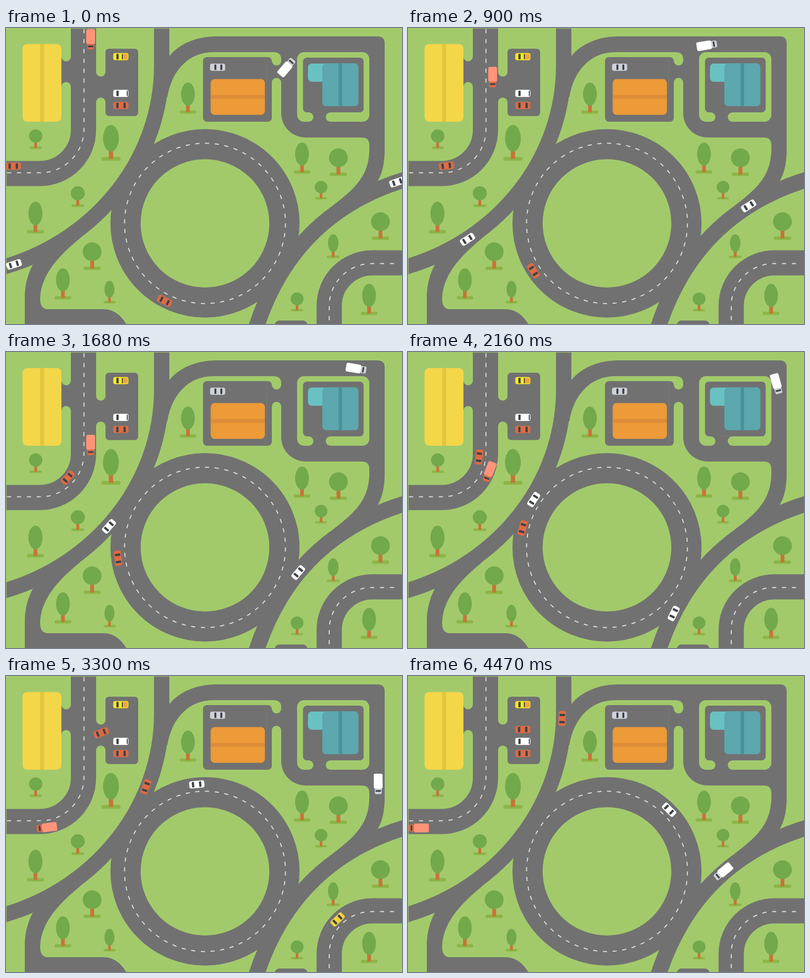
An HTML page that plays this animation: 800x600 px, repeating every 4.5 s.

```html
<!DOCTYPE html>
<html lang="en">
<head>
<meta charset="utf-8">
<title>Town traffic</title>
<style>
  html, body { margin: 0; width: 100%; height: 100%; overflow: hidden; background: #a2ca6b; }
  svg { display: block; width: 800px; height: 600px; }
  .road { fill: #717171; }
  .lane { fill: none; stroke: #717171; }
  .grass { fill: #a2ca6b; }
  .dash { fill: none; stroke: #dedede; stroke-width: 2; stroke-dasharray: 8.5 11.5; }
  .seam { fill: none; stroke: #8a9a62; stroke-width: .6; opacity: .5; }
  .glass { fill: #3b4347; }
</style>
</head>
<body>
<svg viewBox="0 0 800 600">
  <rect class="grass" width="800" height="600"/>

  <!-- roads -->
  <path class="lane" stroke-width="51" d="M156.5 -5V206A88.5 88.5 0 0 1 68 295H-5"/>
  <path class="lane" stroke-width="51" d="M653 605V563A87 87 0 0 1 740 476H805"/>
  <path class="lane" stroke-width="31" d="M314.5 -5V75C314.5 265 184 428 0 483L-10 486"/>
  <path class="lane" stroke-width="32" d="M810 306C622 362 543 492 506 605"/>
  <path class="road" d="M54 480C44 500 38 520 38 545V600H243C232 582 217 570 197 570H85Q69 570 69 550C69 501 108 460 150 426L120 430Z"/>
  <rect class="road" x="543" y="593" width="66" height="20" rx="9"/>
  <path class="road" d="M330 57C350 32 385 17 425 17H751Q765 17 765 31V248C765 272 760 295 752 308L740 345L660 360C702 328 732 302 734 250V237Q734 222 719 222H606A50 49 0 0 1 556 173V63Q556 49 540 49H418C370 49 335 85 326 140L315 140V57Z"/>
  <circle class="lane" cx="402" cy="396" r="160.5" stroke-width="61"/>

  <!-- lots and driveways -->
  <rect class="road" x="201" y="42" width="66" height="136.5" rx="7"/>
  <rect class="road" x="398" y="59" width="139" height="131" rx="8"/>
  <rect class="grass" x="588" y="49" width="146" height="141" rx="14"/>
  <rect class="road" x="600" y="60" width="122.5" height="111" rx="8"/>
  <rect class="road" x="611" y="165" width="45" height="27"/>
  <path class="road" d="M111 58H132V119H111ZM181 89H202V150H181ZM536 67H557V110H536Z"/>
  <g id="caps" class="grass"></g>
  <path class="seam" d="M526.5 59V190M621 171H646"/>
  <path class="grass" d="M0 0H800V1H1V600H0Z"/>

  <!-- lane markings -->
  <path class="dash" d="M2 293.5H69A88.5 88.5 0 0 0 157.5 205V0"/>
  <path class="dash" d="M784 477.5H739A86 86 0 0 0 653 563V600"/>
  <circle class="dash" cx="402" cy="396" r="162.5" pathLength="52" style="stroke-dasharray:.43 .57"/>

  <!-- buildings -->
  <rect x="33.5" y="32.5" width="78.5" height="157.5" rx="9" fill="#f4d649"/>
  <rect x="69" y="32.5" width="8" height="157.5" fill="#e3c540"/>
  <rect x="413.5" y="103.5" width="109.5" height="72.5" rx="8" fill="#ed9a38"/>
  <rect x="413.5" y="136" width="109.5" height="7.5" fill="#dd8d37"/>
  <rect x="610" y="72" width="45" height="37" rx="8" fill="#69c1c1"/>
  <rect x="639" y="71.5" width="73" height="87" rx="8" fill="#5ca8ae"/>
  <rect x="672" y="71.5" width="7" height="87" fill="#4c9195"/>

  <g id="trees"></g>
  <g id="cars"></g>
</svg>
<script>
const LOOP = 4.5, STEP = .03;
const $ = id => document.getElementById(id);
const add = (id, markup) => $(id).insertAdjacentHTML('beforeend', markup);
const fill = color => `fill="${color}"`;
const box = (x, y, w, h, r, paint) =>
  `<rect x="${x}" y="${y}" width="${w}" height="${h}" rx="${r}" ${paint}/>`;

// a driveway opening has a rounded verge end on both sides
function verges(x1, y1, x2, y2) {
  for (const [x, y] of [[x1, y1], [x2, y2]]) add('caps', `<circle cx="${x}" cy="${y}" r="9.5"/>`);
}
verges(121.5, 58, 121.5, 119);
verges(191.5, 89, 191.5, 150.5);
verges(546.5, 66.5, 546.5, 110.5);
verges(611.5, 180.5, 655.5, 180.5);

// every part of a tree scales with the height r of its crown
function tree(x, y, r, { width, drop, shade, trunk }) {
  const w = r * trunk, half = r * shade, base = y + r * drop;
  add('trees', box(x - half, base, 2 * half, w * .9, w * .45, fill('#8db547')) +
    box(x - w / 2, y, w, r * drop + w / 2, .5, fill('#c5753a')) +
    `<ellipse cx="${x}" cy="${y}" rx="${r * width}" ry="${r}" fill="#72a94a"/>`);
}
const ROUND = { width: 1, drop: 1.58, shade: .92, trunk: .41 };
const TALL = { width: .59, drop: 1.4, shade: .72, trunk: .32 };
tree(60, 219, 13.5, ROUND);
tree(145, 335, 14.2, ROUND);
tree(174, 453.5, 19, ROUND);
tree(671.5, 263, 19, ROUND);
tree(636.5, 322.5, 12.8, ROUND);
tree(756.5, 392.5, 19, ROUND);
tree(588, 549, 13, ROUND);
tree(212, 223.5, 27, TALL);
tree(59.5, 376, 24, TALL);
tree(115, 510.5, 23.5, TALL);
tree(209, 529.5, 17, TALL);
tree(367.5, 134, 23.5, TALL);
tree(598, 255.5, 23.5, TALL);
tree(661, 436, 18, TALL);
tree(733.5, 542, 23.5, TALL);

// vehicles are drawn facing right around their middle
const ORANGE = '#dd6b43', SILVER = '#ced1d8', WHITE = '#fff';
const body = color => box(-15.3, -7.3, 30.6, 14.6, 4, fill(color));
const glass = (x, w = 4.6) => box(x, -5.5, w, 11, 1.2, 'class="glass"');
const car = color => body(color) + glass(-9.9) + glass(4.6);
const truck = (cargo, cab) => box(6, -7, 14.5, 14, 3, fill(cab)) + glass(12.5, 3.4) +
  box(-20.8, -8.9, 30, 17.8, 3.2, fill(cargo));

const park = (x, y, art, turn = 0) =>
  add('cars', `<g transform="translate(${x} ${y}) rotate(${turn})">${art}</g>`);
park(232, 58, body('#f8ea22') + box(3, -5.5, 11, 11, 2, fill('#f0a63a')) + glass(-9) + glass(2, 2));
park(232, 132.5, body(WHITE) + glass(-9) + glass(12, 2));
park(232, 157, car(ORANGE), 180);
park(427.5, 79.5, body(SILVER) + glass(-6.5, 4) + glass(5.5, 4));

// marks are [seconds, pixels along the route]; speed is steady between them
const fleet = [];
function drive(art, d, ...marks) {
  const route = document.createElementNS('http://www.w3.org/2000/svg', 'path');
  route.setAttribute('d', d);
  add('cars', `<g>${art}</g>`);
  fleet.push({ node: $('cars').lastElementChild, route, marks });
}
drive(car(WHITE), 'M810 306C622 362 543 492 506 605L490 655',
  [0, 21], [.9, 134], [1.68, 265], [2.16, 364]);
drive(car(WHITE), 'M0 484C80 462 163 407 210 351C225 335 240 321 252 302A177 177 0 0 1 579 396',
  [0, 17], [.9, 133], [2.61, 387], [4.47, 635]);
drive(car(ORANGE), 'M402 573A177 177 0 0 1 225 396C226 360 243 325 252 302S297 195 303 158S312 100 312 60',
  [0, 85], [1.68, 256], [2.61, 376], [4.47, 602]);
drive(car(ORANGE), 'M0 280H68A76 76 0 0 0 144 204C146 150 165 108.5 232 108.5',
  [0, 15], [1.68, 132], [2.61, 222], [3.72, 340]);
drive(car('#f4d13f'), 'M640 660V564A98 98 0 0 1 738 466H850',
  [2.61, 81], [3.9, 256]);
drive(truck('#ff9479', ORANGE), 'M171 0V206A102 102 0 0 1 69 308H-40',
  [0, 23], [.9, 99.5], [2.61, 295], [3.3, 353], [4.47, 414]);
drive(truck(WHITE, SILVER), 'M567 79.5C580 67 585 35 604 35C640 30 680 29 707 33.5S748 45 749.5 109L752 220C752 255 747 281 734.5 303.5S690 353 641 393L560 460',
  [0, 0], [.9, 60], [1.68, 164], [2.61, 265], [3.9, 463], [4.47, 594]);

function travelled(marks, t) {
  let i = 1;
  while (i < marks.length - 1 && marks[i][0] < t) i++;
  const [t0, s0] = marks[i - 1], [t1, s1] = marks[i];
  return s0 + (s1 - s0) * (t - t0) / (t1 - t0);
}

// heading follows the chord between two points around the middle
function pose(route, s) {
  const at = d => route.getPointAtLength(Math.max(0, d));
  const mid = at(s), rear = at(s - 6), front = at(s + 6);
  const turn = Math.atan2(front.y - rear.y, front.x - rear.x) * 180 / Math.PI;
  return `translate(${mid.x} ${mid.y}) rotate(${turn})`;
}

const start = performance.now();
function draw() {
  const t = Math.floor((performance.now() - start) / 1000 % LOOP / STEP) * STEP;
  for (const { node, route, marks } of fleet)
    node.setAttribute('transform', pose(route, travelled(marks, t)));
  requestAnimationFrame(draw);
}
draw();
</script>
</body>
</html>
```
